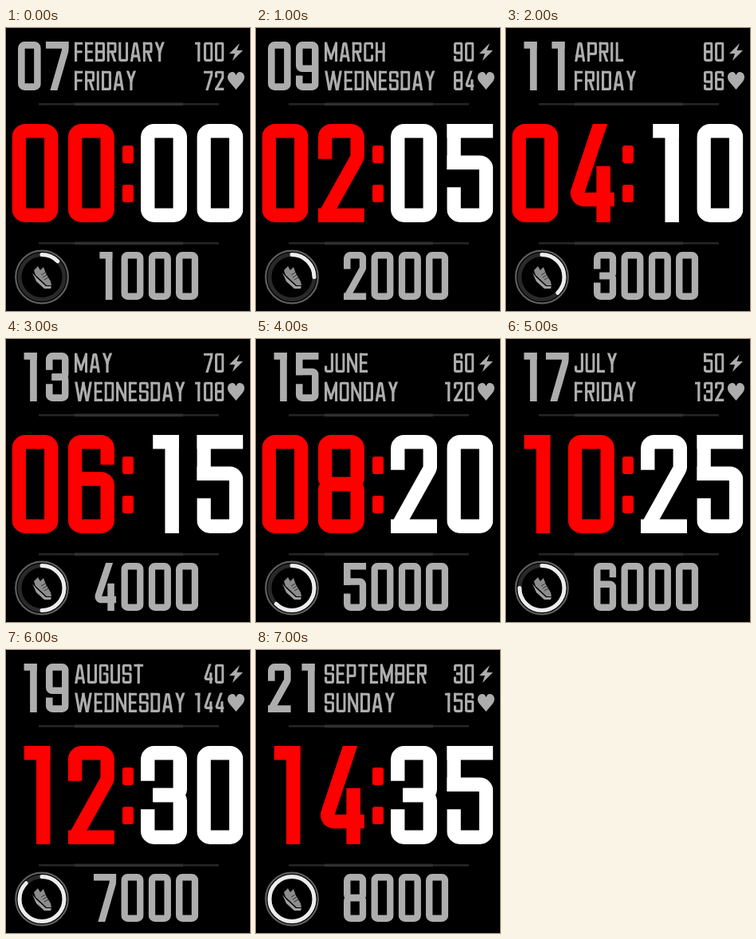
Recreate the animation shown at these times as an HTML page with a canvas. Size 306 px wide and 354 px high, loop 8000 ms.

```html
<!DOCTYPE html>
<html lang="en">
<head>
<meta charset="utf-8">
<title>Watch face</title>
<style>
  html, body { margin: 0; width: 100%; height: 100%; overflow: hidden; background: #000; }
  canvas { display: block; }
</style>
</head>
<body>
<canvas id="face" width="306" height="354" role="img"></canvas>
<script>
const canvas = document.getElementById('face');
const ctx = canvas.getContext('2d');
const GREY = '#adadad';
const MONTHS = ['FEBRUARY', 'MARCH', 'APRIL', 'MAY', 'JUNE', 'JULY', 'AUGUST', 'SEPTEMBER'];
const DAYS = ['FRIDAY', 'WEDNESDAY', 'FRIDAY', 'WEDNESDAY', 'MONDAY', 'FRIDAY', 'WEDNESDAY', 'SUNDAY'];

// Condensed stroke lettering: each pair is an x,y point on a grid from 0 to g (16); "-" and "i" lie just outside.
const GLYPHS = {
  0: '00g0gg0g00', 1: '60c0 c0cg', 2: '0400g0g50g 0ggg', 3: '0400g0g868 68g8gg0g0c',
  4: 'd-0dgd e8eg', 5: 'g000 0006 06g6gg0g0c', 6: 'g3g0000gggg707', 7: '00g0 g0g24i',
  8: '00g0g80800 08g8gg0g08', 9: '0d0gggg00009g9',
  A: '0i60a0gi 2ccc', B: '0g00 00g0g808 08g8gg0g', C: 'g4g0000ggggc', D: '0g00 00g0gg0g',
  E: '0g00 00g0 08e8 0ggg', F: '0g00 00g0 08e8', G: 'g4g0000gggg8a8', H: '000g g0gg 08g8',
  I: '000g', J: 'g0gg0g0c', L: '000g 0ggg', M: '000g g0gg 008e 8eg0', N: '000g g0gg 00gg',
  O: '00g0gg0g00', P: '000g 00g0ga0a', R: '000g 00g0g808 88gi', S: 'g4g00008g8gg0g0c',
  T: '00g0 808g', U: '000gggg0', W: '0-4i 4i80 80ci cig-', Y: '0-88 88g- 888g'
};
const WIDTHS = { A: .55, E: .43, F: .43, I: .16, J: .45, L: .41, M: .66, N: .54, W: .9, Y: .53 };
const GAP = .1;
const glyphWidth = c => /\d/.test(c) ? .472 : WIDTHS[c] || .495;
const textWidth = (s, h) => h * ([...s].reduce((sum, c) => sum + glyphWidth(c) + GAP, 0) - GAP);

function roundedLine(points, radius) {
  const [first] = points, last = points[points.length - 1];
  const closed = first[0] === last[0] && first[1] === last[1];
  const mid = [(first[0] + points[1][0]) / 2, (first[1] + points[1][1]) / 2];
  const path = closed ? [mid, ...points.slice(1), mid] : points;
  ctx.beginPath();
  ctx.moveTo(...path[0]);
  for (let i = 1; i < path.length - 1; i++) ctx.arcTo(...path[i], ...path[i + 1], radius);
  ctx.lineTo(...path[path.length - 1]);
  ctx.stroke();
}

function drawGlyph(c, x, y, h, weight) {
  const w = glyphWidth(c) * h, line = weight * h;
  const at = (v, size) => line / 2 + (v === '-' ? -2 : parseInt(v, 36)) * (size - line) / 16;
  ctx.save();
  ctx.translate(x, y);
  ctx.beginPath();
  ctx.rect(0, 0, w, h);
  ctx.clip();
  ctx.lineWidth = line;
  ctx.lineCap = 'square';
  for (const stroke of GLYPHS[c].split(' ')) {
    const points = stroke.match(/../g).map(p => [at(p[0], w), at(p[1], h)]);
    roundedLine(points, h * .065);
  }
  ctx.restore();
}

function drawText(s, x, y, h, color = GREY, weight = .142) {
  ctx.strokeStyle = color;
  for (const c of s) {
    drawGlyph(c, x, y, h, weight);
    x += (glyphWidth(c) + GAP) * h;
  }
}

const label = (s, x, y) => drawText(s, x, y, 24.5, GREY, .13);
const labelRight = (s, right, y) => label(s, right - textWidth(s, 24.5), y);

function shape(color, d) {
  ctx.fillStyle = color;
  ctx.fill(new Path2D(d));
}

function arc(radius, width, color, part = 1) {
  ctx.beginPath();
  ctx.arc(45, 311.5, radius, -Math.PI / 2, (part * 2 - .5) * Math.PI);
  ctx.lineCap = 'round';
  ctx.lineWidth = width;
  ctx.strokeStyle = color;
  ctx.stroke();
}

function divider(y) {
  shape('#262626', `M41 ${y - 1}H267V${y + 1.5}H41Z`);
  shape('#303030', `M86 ${y - 1.5}H222V${y + 2}H86Z`);
}

function drawShoe() {
  shape('#8c8c8c', 'M35 303L40 298L43 303L47 299L50 307L56 317L57 322L51 322L37 309Z');
  shape('#a0a0a0', 'M33 306L38 312L50 323L57 323L56 326L48 326L38 317Z');
  ctx.lineCap = 'butt';
  ctx.lineWidth = 1;
  ctx.strokeStyle = '#333';
  ctx.stroke(new Path2D('M44 309L49 306M46 312L51 309M48 315L53 312'));
}

function drawFace(step) {
  const two = n => String(n).padStart(2, '0');
  const hours = two(step * 2), minutes = two(step * 5);
  ctx.fillStyle = '#000';
  ctx.fillRect(0, 0, 306, 354);

  drawText(two(7 + step * 2), 15, 17, 61);
  label(MONTHS[step], 86, 17.5);
  label(DAYS[step], 86, 53.5);
  labelRight(String(100 - step * 10), 273.5, 17.5);
  labelRight(String(72 + step * 12), 273.5, 53.5);
  shape(GREY, 'M293 19L280 32H287L284 41L297 28H289.5Z');
  shape(GREY, 'M288.5 77L280 67C275 60 280 54 285 55Q287.5 56 288.5 59Q289.5 56 292 55C297 54 302 60 297 67Z');

  divider(95);
  drawText(hours, 7.5, 120, 123, '#f00');
  drawText(minutes, 169, 120, 123, '#fff');
  ctx.fillStyle = '#f00';
  for (const y of [147, 196]) {
    ctx.beginPath();
    ctx.roundRect(146, y, 14, 22, 3);
    ctx.fill();
  }
  divider(269);

  arc(32.8, 2.2, '#606060');
  arc(28, 5, '#292929');
  arc(28, 5, '#ececec', (step + 1) / 8);
  drawShoe();
  drawText(String((step + 1) * 1000), 110, 280, 60);
  canvas.setAttribute('aria-label', `${hours}:${minutes}, ${DAYS[step]} ${MONTHS[step]}`);
}

const start = performance.now();
let shown = -1;
function tick() {
  const step = Math.floor((performance.now() - start) / 1000) % 8;
  if (step !== shown) drawFace(shown = step);
  requestAnimationFrame(tick);
}
tick();
</script>
</body>
</html>
```
